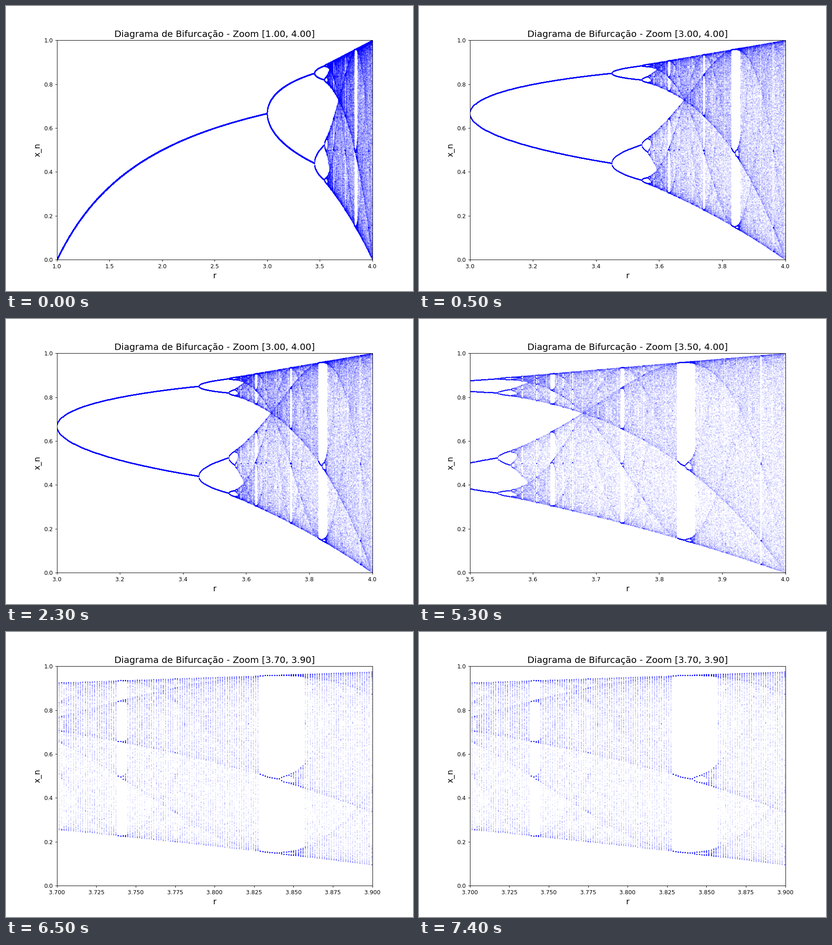
Animation of 894x626 px, one loop 8 s. Source, as a matplotlib script:

```python
import numpy as np
import matplotlib.pyplot as plt
from matplotlib.animation import FuncAnimation

WIDTH, HEIGHT, DPI = 894, 626, 89.4
STEP_MS, STEPS = 500, 16
# (first step, r range)
VIEWS = [(0, (1.0, 4.0)), (1, (3.0, 4.0)), (7, (3.5, 4.0)), (13, (3.7, 3.9))]


def bifurcation(count=2000, settle=900, keep=300):
    """Logistic map orbits, kept once they have settled."""
    r = np.linspace(1.0, 4.0, count)
    x = np.full(count, 0.5)
    orbit = np.empty((keep, count))
    for i in range(settle + keep):
        x = r * x * (1 - x)
        if i >= settle:
            orbit[i - settle] = x
    return r, orbit


r_values, orbits = bifurcation()

plt.rcParams["font.family"] = "DejaVu Sans"
# The tiny margin keeps rounding from losing a pixel.
fig, ax = plt.subplots(
    figsize=((WIDTH + 1e-6) / DPI, (HEIGHT + 1e-6) / DPI), dpi=DPI
)
points, = ax.plot([], [], "b.", markersize=0.5, alpha=0.25)
title = ax.set_title("", fontsize=16)
ax.set_xlabel("r", fontsize=14)
ax.set_ylabel("x_n", fontsize=14)
ax.set_ylim(0, 1)


def draw(step):
    lo, hi = [view for start, view in VIEWS if start <= step][-1]
    seen = (r_values >= lo) & (r_values <= hi)
    x = orbits[:, seen]
    points.set_data(np.tile(r_values[seen], len(x)), x.ravel())
    ax.set_xlim(lo, hi)
    title.set_text(f"Diagrama de Bifurcação - Zoom [{lo:.2f}, {hi:.2f}]")
    return points, title


anim = FuncAnimation(
    fig, draw, frames=STEPS, interval=STEP_MS, repeat=True, repeat_delay=0
)
plt.show()
```
